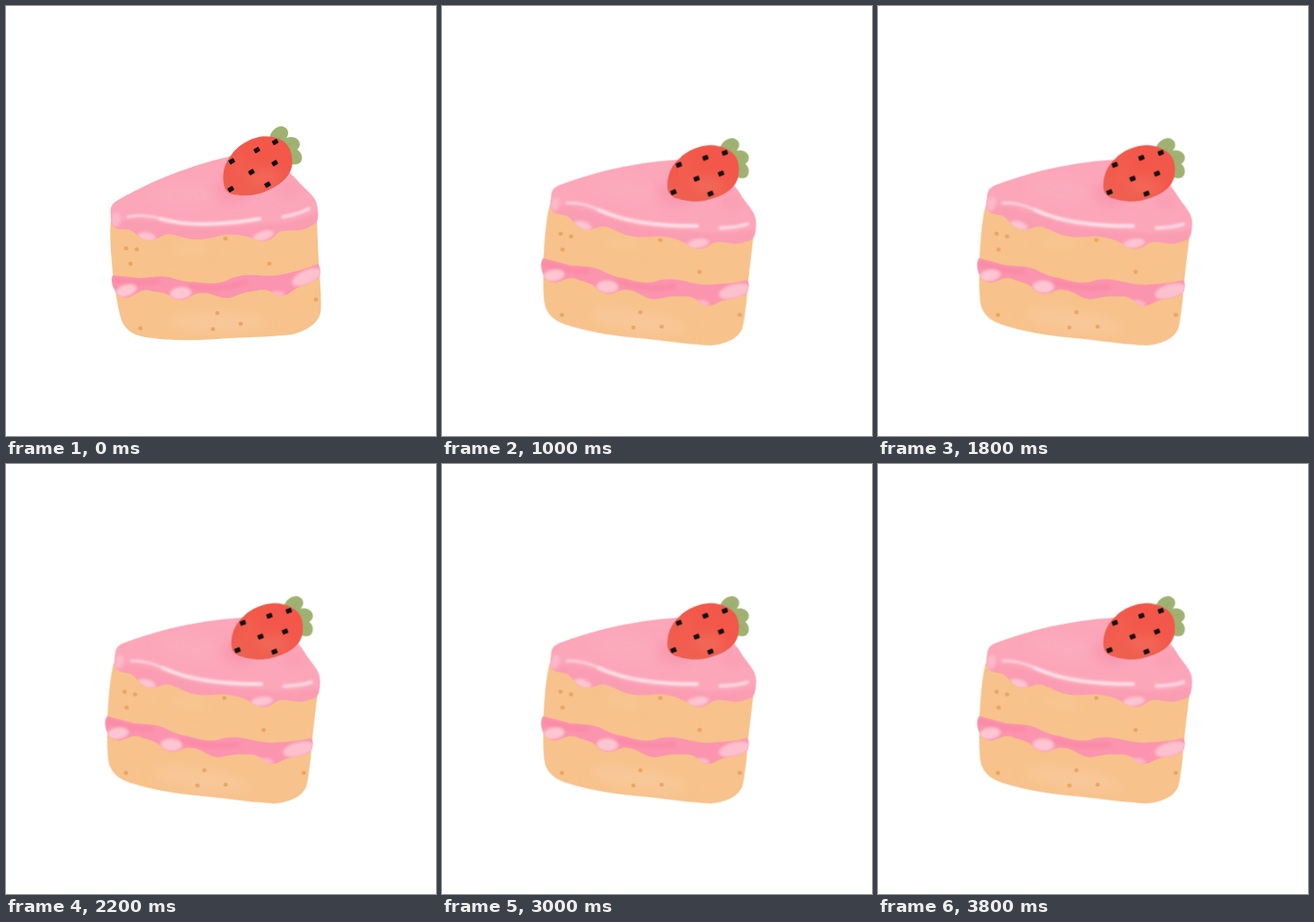
Animation, 480 px wide and 479 px high, one loop 4000 ms. Source, as an HTML page without scripts:

```html
<!DOCTYPE html>
<html lang="en">
<head>
<meta charset="utf-8">
<title>Strawberry cake</title>
<style>
  html, body { margin: 0; width: 100%; height: 100%; overflow: hidden; background: #fff; }
  svg { display: block; width: 100%; height: 100%; }
  .cake { transform-origin: 0 0; animation: rock 800ms step-end infinite; }
  @keyframes rock {
    0%, 100% { transform: none; }
    25%, 75% { transform: translate(228.75px, 276.25px) rotate(9.25deg) translate(-232.75px, -276.75px); }
    50% { transform: translate(225.5px, 275.25px) rotate(24.4deg) translate(-232.75px, -276.75px); }
  }
</style>
</head>
<body>
<svg viewBox="0 0 480 479" preserveAspectRatio="none">
  <defs>
    <filter id="soft" x="-30%" y="-60%" width="160%" height="220%"><feGaussianBlur stdDeviation="1.7"/></filter>
    <filter id="fine" x="-30%" y="-60%" width="160%" height="220%"><feGaussianBlur stdDeviation="0.9"/></filter>
    <filter id="wash" x="-50%" y="-100%" width="200%" height="300%"><feGaussianBlur stdDeviation="6"/></filter>
    <linearGradient id="berry" x1="0.6" y1="0" x2="0.4" y2="1">
      <stop offset="0" stop-color="#f3574a"/>
      <stop offset="0.6" stop-color="#f2584a"/>
      <stop offset="1" stop-color="#ee6050"/>
    </linearGradient>
    <path id="sponge" d="M117 240 C115 258 118 285 120 304 C123 322 125 338 129 350 C133 361 143 367 156 369 C190 374 222 372 250 370 C276 369 300 368 319 366 C339 361 351 351 351.500 338 C352 316 350 300 349 285 L347 238 Z"/>
    <path id="icing" d="M117 232 C116 223 118 220 127 215 C150 202 176 190 203 181 C225 173 250 167 275 163 C300 170 316 184 325 194 C333 204 346 211 347.500 223 C349 234 349 240 344 243 C338 246 333 250 324 250 C315 250 307 249 302 254 C297 261 288 264 280 261 C272 257 262 254 250 254.500 C237 255 224 261 211 260 C198 259 192 255 182 254 C174 254 170 261 159 261 C148 260 146 252 137 249 C130 248 124 250 120 246 C117 242 117 238 117 232 Z"/>
    <path id="cream" d="M119 300 C130 301 140 302 150 303 C162 302 172 300 182 302 C192 305 200 308 212 307.500 C224 309 236 310 246 306 C256 300 268 299 281 300 C293 301 302 301 313 298 C326 295 338 292 348 287.500 C352 292 352 300 348 304 C340 310 329 311 320 317 C315 322 307 325 300 321 C293 316 288 315 280 317 C270 318 263 320 256 323 C246 328 238 324 229 321 C218 318 211 320 206 324 C200 329 189 329 183 323 C177 318 168 319 160 317 C150 315 146 321 139 324 C131 327 124 322 121 316 C118 310 117 305 119 300 Z"/>
    <path id="fruit" d="M242.500 193 C242 183 245 174 251.500 166 C258 156 271 148 284 145.500 C293 144.500 301 145.500 307 149 C314 153 317 158 318.500 165 C320.500 174 319.500 180 317 185 C312 194 304 200 293 205 C285 209 277 211 268 211 C260 211 254 211 249 208 C244 205 243 200 242.500 193 Z"/>
    <clipPath id="inSponge"><use href="#sponge"/></clipPath>
    <clipPath id="inIcing"><use href="#icing"/></clipPath>
    <clipPath id="inCream"><use href="#cream"/></clipPath>
    <clipPath id="inFruit"><use href="#fruit"/></clipPath>
    <rect id="seed" x="-3.2" y="-2.6" width="6.400" height="5.200" rx="0.8" transform="rotate(-30)"/>
    <ellipse id="crumb" rx="2.5" ry="2.2"/>
  </defs>

  <g class="cake">
    <use href="#sponge" fill="#f7c28b"/>
    <g clip-path="url(#inSponge)">
      <g filter="url(#wash)">
        <ellipse cx="205" cy="270" rx="20" ry="9" fill="#f9c997" opacity=".6"/>
        <ellipse cx="235" cy="352" rx="55" ry="12" fill="#f9ca9b" opacity=".8"/>
      </g>
    </g>
    <g fill="#e9a565">
      <use href="#crumb" x="134" y="270"/>
      <use href="#crumb" x="146" y="271"/>
      <use href="#crumb" x="139" y="287"/>
      <use href="#crumb" x="245" y="259"/>
      <use href="#crumb" x="294" y="287"/>
      <use href="#crumb" x="346" y="327"/>
      <use href="#crumb" x="236" y="342"/>
      <use href="#crumb" x="262" y="354"/>
      <use href="#crumb" x="231" y="360"/>
      <use href="#crumb" x="150" y="359"/>
    </g>

    <use href="#cream" fill="#fb94ae"/>
    <g clip-path="url(#inCream)">
      <g filter="url(#soft)">
        <path d="M120 305 Q146 311 172 306 M204 312 Q238 318 270 307" fill="none" stroke="#fa85a2" stroke-width="7" opacity=".6"/>
        <ellipse cx="134" cy="317" rx="12" ry="6.5" fill="#fdc6d2" transform="rotate(-18 134 317)"/>
        <ellipse cx="195" cy="320" rx="12" ry="7" fill="#fdc6d2" transform="rotate(-6 195 320)"/>
        <ellipse cx="336" cy="302" rx="18" ry="8" fill="#fdc0ce" transform="rotate(-24 336 302)"/>
        <ellipse cx="303" cy="321" rx="8" ry="3.5" fill="#fcb9c9"/>
      </g>
    </g>

    <use href="#icing" fill="#fca6ba"/>
    <g clip-path="url(#inIcing)">
      <g filter="url(#soft)">
        <path d="M124 240 C155 235 180 244 207 247 C240 250 265 244 292 243 C312 242 330 237 348 230 V266 H116 Z" fill="#fb9bb1" opacity=".8"/>
        <ellipse cx="157" cy="257" rx="10" ry="4.500" fill="#fdc5d1" transform="rotate(8 157 257)"/>
        <ellipse cx="287" cy="256" rx="12" ry="5" fill="#fdc5d1" transform="rotate(-18 287 256)"/>
        <ellipse cx="123" cy="238" rx="5" ry="8" fill="#fdc0cd" opacity=".7"/>
      </g>
      <g filter="url(#wash)">
        <ellipse cx="250" cy="207" rx="22" ry="12" fill="#f992aa" opacity=".6"/>
        <ellipse cx="316" cy="204" rx="15" ry="10" fill="#fa9ab0" opacity=".5"/>
        <ellipse cx="200" cy="210" rx="38" ry="12" fill="#fcadbf" opacity=".6"/>
      </g>
      <g filter="url(#fine)" fill="none" stroke="#fee0e6" stroke-linecap="round">
        <path d="M136 235 C150 232 162 234 178 238" stroke-width="3" opacity=".75"/>
        <path d="M172 237 C184 240 194 242 207 242.500 C235 244 260 241 283 237" stroke-width="4.2"/>
        <path d="M309 235 Q326 232 338 226" stroke-width="4" opacity=".85"/>
      </g>
    </g>

    <path d="M294 150 C294 141 300 134 308 134 C315 135 317 142 313 147 C321 144 328 148 328 154 C328 157 326 159 325 160 C330 163 332 169 329 174 C326 177 321 177 317 176 Z" fill="#a0b272"/>
    <path d="M305 148 L309 140 M314 155 L322 152 M318 165 L325 169" stroke="#93a765" stroke-width="1.5" stroke-linecap="round" opacity=".4"/>

    <use href="#fruit" fill="url(#berry)"/>
    <g clip-path="url(#inFruit)">
      <g filter="url(#wash)">
        <ellipse cx="288" cy="190" rx="19" ry="9" fill="#f37462" opacity=".55"/>
        <ellipse cx="260" cy="178" rx="9" ry="16" fill="#f46353" opacity=".5"/>
      </g>
    </g>
    <g fill="#15100f">
      <use href="#seed" x="252" y="173"/>
      <use href="#seed" x="280" y="160.500"/>
      <use href="#seed" x="300.500" y="151.500"/>
      <use href="#seed" x="274" y="185"/>
      <use href="#seed" x="300" y="175"/>
      <use href="#seed" x="251" y="204"/>
      <use href="#seed" x="292" y="199"/>
    </g>
  </g>
</svg>
</body>
</html>
```
